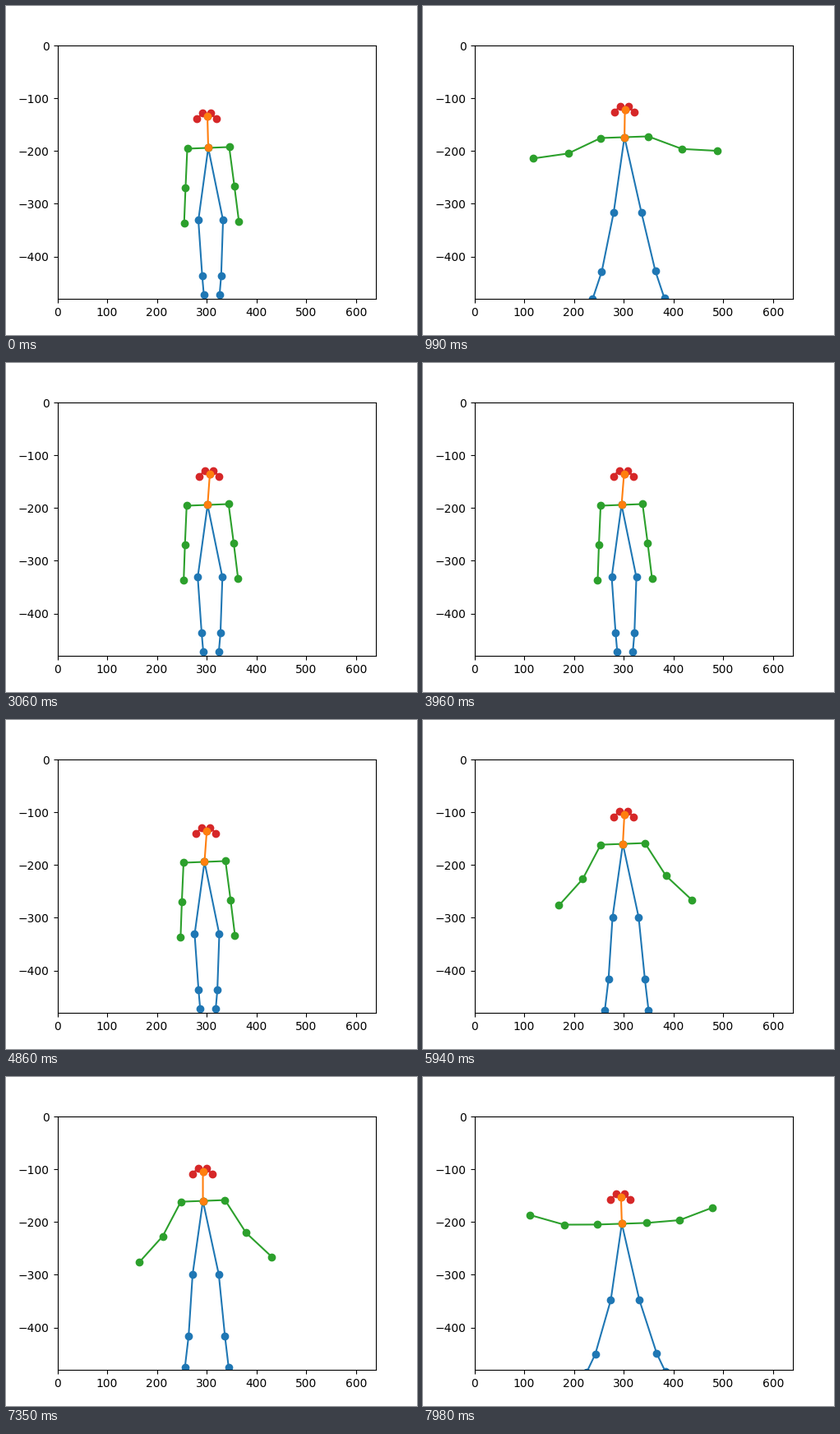
Animation, 500 px wide and 400 px high, one loop 8 s. Source, as a matplotlib script:

```python
import numpy as np
import matplotlib.pyplot as plt
from matplotlib.animation import FuncAnimation

LOOP = 8000
STEP = 25

# Jump count at a few moments (seconds): the tempo slows a little
BEAT_T = [0, 1.86, 3.06, 4.86, 5.94, 7.35, 7.98]
BEAT_N = [0, 2.5, 4, 6, 7.21, 8.78, 9.43]

# Ear, eye, nose, eye, ear relative to the neck
HEAD = np.array([(-13, -32), (-6, -39), (0, -35), (4, -39), (11, -32)], float)


def bone(start, side, degrees, length):
    """End of a bone that hangs down and swings outward by an angle."""
    a = np.radians(degrees)
    return start + length * np.array([side * np.sin(a), np.cos(a)])


def arm(neck, side, spread, swing):
    shoulder = neck + [side * (25.5 + 5 * swing), -side]
    tilt = 2.5 * side
    elbow = bone(shoulder, side, 5 + 93 * swing + tilt, 48 - 9 * swing ** 2)
    wrist = bone(elbow, side, 4.5 + 109 * spread + tilt, 43)
    return [shoulder, elbow, wrist]


def leg(neck, side, spread, swing, hop):
    hip = neck + [3 + spread + side * (15 + 2.5 * spread), 88 + 5 * swing]
    knee = bone(hip, side, -3 + 21 * spread + side, 68 + 8 * hop)
    ankle = bone(knee, side, -5 + 32 * spread, 23 + 17 * hop)
    return [hip, knee, ankle]


def figure_at(t):
    """Legs, arms, face and spine in pixels at t seconds."""
    turn = np.pi * np.interp(t, BEAT_T, BEAT_N)
    spread = np.sin(turn) ** 2            # 0 closed, 1 wide open
    swing = spread ** 1.3                 # the upper arms start later
    hop = abs(np.sin(2 * turn)) ** 3      # two hops in each cycle

    sway = 2 * np.cos(2 * np.pi * (t - 3.06) / 2.6) - 0.6 * t
    neck = np.array([245.1 + sway, 172.5 + 8.5 * swing - 27 * hop])
    lean = 4 * np.sin(np.pi * t / 8) - 1
    head = HEAD + neck + [lean, 6 * spread - 3]

    left_arm, right_arm = [arm(neck, s, spread, swing) for s in (-1, 1)]
    left_leg, right_leg = [leg(neck, s, spread, swing, hop) for s in (-1, 1)]
    return (left_leg[::-1] + [neck] + right_leg,
            left_arm[::-1] + [neck] + right_arm,
            head,
            [neck, head[2]])


def to_data(points):
    x, y = np.array(points).T
    return (x - 62.5) * 640 / 387.5, (48 - y) * 480 / 308


fig = plt.figure(figsize=(5, 4), dpi=100)
ax = fig.add_axes([0.125, 0.11, 0.775, 0.77])
ax.set_xlim(0, 640)
ax.set_ylim(-480, 0)
ax.set_yticks(range(-400, 1, 100))

# Legs, arms, face, spine
lines = [ax.plot([], [], "o-", color=c)[0] for c in ("C0", "C2", "C3", "C1")]


def draw(k):
    t = (k + 0.5) * STEP / 1000
    for line, points in zip(lines, figure_at(t)):
        line.set_data(*to_data(points))
    return lines


anim = FuncAnimation(fig, draw, frames=LOOP // STEP, interval=STEP,
                     repeat=True, repeat_delay=0)
plt.show()
```
